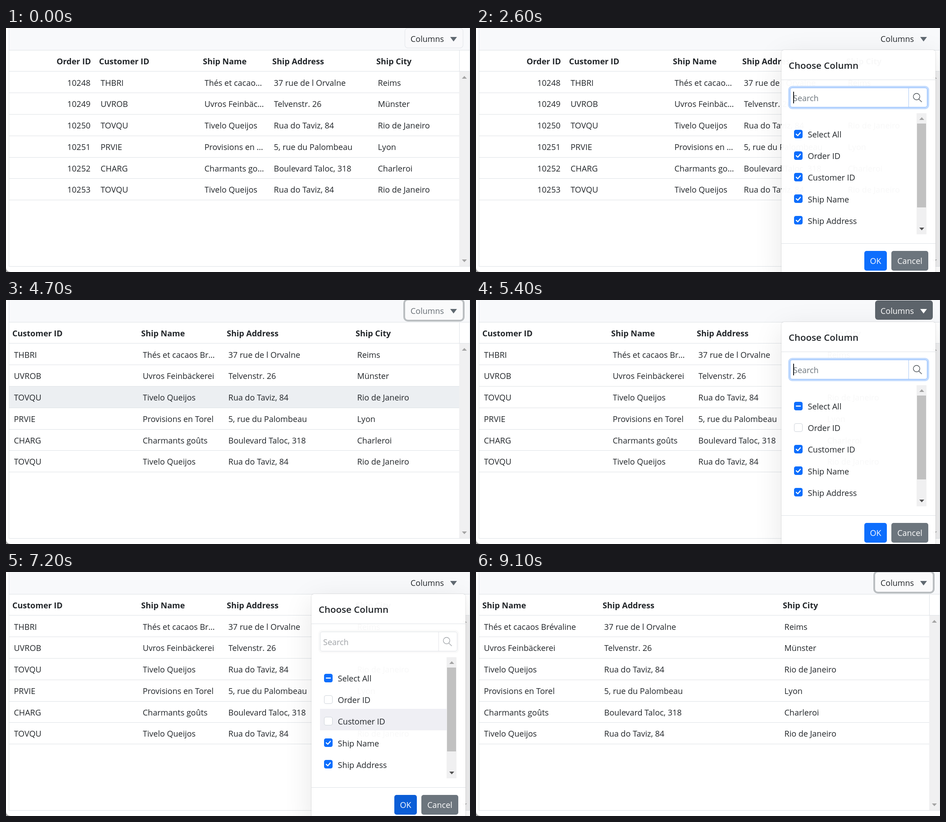
Recreate the animation shown at these times as an HTML page. Size 1030 px wide and 544 px high, loop 9200 ms.

```html
<!DOCTYPE html>
<html lang="en">
<head>
<meta charset="utf-8">
<title>Column chooser</title>
<style>
html, body { margin: 0; width: 100%; height: 100%; overflow: hidden; background: #a2a2a2; }
#stage {
  position: absolute; left: 0; top: 0; width: 1030px; height: 544px; overflow: hidden;
  background: #fff; border-radius: 0 0 0 10px; color: #212529;
  font: 18px/24px "Open Sans", "Noto Sans", sans-serif;
}
#stage div { position: absolute; box-sizing: border-box; white-space: nowrap; }
.line { background: #dee2e6; }
.bar { background: #f8f9fb; }
.head { font-weight: 700; }
.cell { overflow: hidden; text-overflow: ellipsis; }
.right { text-align: right; }
.hover { background: #eceff2; }
.track { background: #f0f0f1; }
.thumb { background: #c1c1c1; }
.up, .down { background: #a3a3a3; clip-path: polygon(0 100%, 50% 0, 100% 100%); }
.down { clip-path: polygon(0 0, 100% 0, 50% 100%); }
.dark { background: #505050; }

.menu { border-radius: 6px; }
.menu .down { background: #5f6870; }
.menu.outlined { background: #f9f9fb; box-shadow: 0 0 0 1px #e2e5e9; }
.menu.pressed { background: #5c636a; color: #fff; }
.menu.pressed .down { background: #fff; }
.menu.ring { background: #fafafb; box-shadow: 0 0 0 4px #babec1; }
.menu.ring.pressed { background: #5c636a; }
.menu.grey { color: #666d74; }

.popup {
  background: rgba(255, 255, 255, .97); border-radius: 6px 6px 0 0;
  box-shadow: 0 0 0 1px rgba(0, 0, 0, .09), 0 16px 64px rgba(0, 0, 0, .1);
}
.title { font-size: 20.5px; font-weight: 600; }
.search { border: 1px solid #dee2e6; border-radius: 5px; background: #fff; color: #a0a4a8; box-shadow: 0 0 0 4px #fafafa; }
.search .line { background: #e4e6e9; }
.search.focus { border-color: #86b7fe; color: #6c757d; box-shadow: 0 0 0 4px #c2dbfe; }
.search.focus .line { background: #a9c9f5; }
.search svg { position: absolute; left: 271px; top: 10px; stroke: #a5a9ad; fill: none; stroke-width: 1.4; }
.search.focus svg { stroke: #50565c; }
.caret { background: #212529; }
.pick { background: #efeff4; }
.check { border-radius: 4px; border: 1px solid #ced4da; background: #fff; }
.check svg { position: absolute; left: -1px; top: -1px; fill: none; stroke: #fff; stroke-width: 2.4; stroke-linecap: round; stroke-linejoin: round; }
.check.on, .check.some { background: #0d6efd; border-color: #0d6efd; }
.check .tick, .check .dash { display: none; }
.check.on .tick, .check.some .dash { display: inline; }
.button { border-radius: 5px; color: #fff; text-align: center; line-height: 45px; background: #6c757d; }
</style>
</head>
<body>
<div id="stage"></div>
<script>
const LOOP = 9200;
const stage = document.getElementById('stage');

function box(parent, cls, x, y, w, h, text = '') {
  const el = document.createElement('div');
  el.className = cls;
  Object.assign(el.style, { left: x + 'px', top: y + 'px', width: w + 'px', height: h + 'px' });
  el.textContent = text;
  parent.append(el);
  return el;
}

// Text centred on a line; y is the middle
const label = (parent, cls, x, y, w, text) => box(parent, cls, x, y - 12, w, 24, text);
const show = (el, on) => { el.style.visibility = on ? 'inherit' : 'hidden'; };

const orders = [
  ['10248', 'THBRI', 'Thés et cacaos Brévaline', '37 rue de l Orvalne', 'Reims'],
  ['10249', 'UVROB', 'Uvros Feinbäckerei', 'Telvenstr. 26', 'Münster'],
  ['10250', 'TOVQU', 'Tivelo Queijos', 'Rua do Taviz, 84', 'Rio de Janeiro'],
  ['10251', 'PRVIE', 'Provisions en Torel', '5, rue du Palombeau', 'Lyon'],
  ['10252', 'CHARG', 'Charmants goûts', 'Boulevard Taloc, 318', 'Charleroi'],
  ['10253', 'TOVQU', 'Tivelo Queijos', 'Rua do Taviz, 84', 'Rio de Janeiro']
];
const titles = ['Order ID', 'Customer ID', 'Ship Name', 'Ship Address', 'Ship City'];
// Left edge of each column that is shown, and room for the ship name
const layouts = [
  { first: 0, left: [14, 206.5, 437, 591, 822], nameRoom: 133 },
  { first: 1, left: [14, 300, 490, 776], nameRoom: 168 },
  { first: 2, left: [14, 281, 681], nameRoom: 250 }
];
const rowTop = i => Math.round(96.5 + 47.75 * i);

// Grid
box(stage, 'bar', 6, 0, 1024, 49);
const rowHover = box(stage, 'hover', 7, 0, 999, 47);
const views = layouts.map(({ first, left, nameRoom }) => {
  const view = box(stage, '', 0, 0, 1030, 544);
  left.forEach((x, n) => {
    const col = first + n;
    const side = col === 0 ? ' right' : '';
    label(view, 'head' + side, x, 74, side ? 174.5 : 190, titles[col]);
    const room = side ? 170 : col === 2 ? nameRoom : 205;
    orders.forEach((order, i) =>
      label(view, 'cell' + side, x + 3.5, rowTop(i) + 25, room, order[col]));
  });
  return view;
});
box(stage, 'line', 6, 0, 1, 532);
box(stage, 'line', 6, 49, 1024, 1);
box(stage, 'line', 6, 96, 1024, 1);
for (let i = 1; i <= 6; i++) box(stage, 'line', 6, rowTop(i), 1000, 1);
box(stage, 'line', 6, 531, 1024, 1);
box(stage, 'line', 1006, 49, 1, 48);
box(stage, 'track', 1006, 97, 23, 434);
box(stage, 'up', 1012, 107, 11, 6);
box(stage, 'down', 1012, 516, 11, 6);
box(stage, 'line', 1029, 0, 1, 532);

// Popup, in its own coordinates
const popup = box(stage, 'popup', 678, 49, 342, 510);
label(popup, 'title', 16, 34, 200, 'Choose Column');
box(popup, 'line', 0, 66, 342, 1);
box(popup, 'line', 0, 431, 342, 1);

const search = box(popup, 'search', 19, 84, 305, 44);
label(search, '', 6, 22, 100, 'Search');
box(search, 'line', 262, 0, 1, 42);
search.insertAdjacentHTML('beforeend',
  '<svg width="24" height="24"><circle cx="9" cy="9" r="7.2"/><path d="M14 14.5L20.5 21"/></svg>');
const caret = box(popup, 'caret', 26, 93, 2, 26);

const pick = box(popup, 'pick', 19, 0, 281, 48);
const checks = ['Select All', ...titles.slice(0, 4)].map((text, i) => {
  const y = 187 + 48.2 * i;
  label(popup, '', 58.5, y + 1, 200, text);
  const el = box(popup, 'check', 28, Math.round(y - 9.5), 19, 19);
  el.innerHTML = '<svg width="19" height="19"><path class="tick" d="M5 9.8L8.3 13L14 6.5"/>' +
    '<path class="dash" d="M5 9.5H14"/></svg>';
  return el;
});
box(popup, 'track', 300, 141, 22, 270);
box(popup, 'thumb', 301, 164, 20, 187);
box(popup, 'up', 306, 150, 11, 6);
box(popup, 'down dark', 306, 396, 11, 6);
const ok = box(popup, 'button', 184, 448, 50, 44, 'OK');
box(popup, 'button', 244, 448, 82, 44, 'Cancel');

// Toolbar button
const menu = box(stage, 'menu', 886, 1, 128, 43);
label(menu, '', 12, 23, 90, 'Columns');
box(menu, 'down', 100, 19, 15, 10);

const BLUE = '#0d6efd', MID = '#0c66ea', DEEP = '#0b5ed7', ACTIVE = '#0a58ca';
const idle = {
  menu: 'outlined', view: 0, row: -1, popup: 0, focus: true, caret: true,
  pick: -1, checks: ['on', 'on', 'on', 'on', 'on'], ok: BLUE, okRing: false
};
const noOrder = ['some', '', 'on', 'on', 'on'];
const noCustomer = ['some', '', '', 'on', 'on'];
const fresh = { focus: true, caret: true, pick: -1, ok: BLUE, okRing: false };

const closing = (t, view) => [
  [t, { okRing: true, ok: DEEP }],
  [t + 100, { view, popup: .7 }],
  [t + 200, { popup: .3 }],
  [t + 300, { popup: 0, menu: 'ring grey' }]
];
const steps = [
  [0, idle],
  [100, { menu: '' }],
  [1200, { menu: 'pressed' }],
  [1600, { popup: 1 }],
  [1800, { menu: '' }],
  [2100, { caret: false }],
  [2600, { caret: true }],
  [2800, { focus: false, caret: false, pick: 1 }],
  [3000, { checks: noOrder }],
  [3300, { ok: MID }],
  [3400, { ok: DEEP }],
  [3600, { ok: ACTIVE }],
  ...closing(4000, 1),
  [4600, { row: 3 }],
  [4700, { row: 2 }],
  [4800, { row: 0 }],
  [4900, { row: -1, menu: 'ring pressed' }],
  [5000, { menu: 'pressed' }],
  [5300, { ...fresh, popup: .5 }],
  [5400, { popup: 1 }],
  [5600, { menu: '' }],
  [5900, { caret: false }],
  [6400, { caret: true }],
  [6600, { focus: false, caret: false, pick: 2, checks: noCustomer }],
  [7200, { ok: DEEP }],
  ...closing(7800, 2),
  [9100, { menu: 'ring' }]
];

function draw(time) {
  const s = Object.assign({}, ...steps.filter(([t]) => t <= time).map(([, change]) => change));
  menu.className = 'menu ' + s.menu;
  views.forEach((view, i) => show(view, i === s.view));
  show(rowHover, s.row >= 0);
  rowHover.style.top = rowTop(s.row) + 1 + 'px';
  show(popup, s.popup > 0);
  popup.style.opacity = s.popup;
  search.className = s.focus ? 'search focus' : 'search';
  show(caret, s.caret);
  show(pick, s.pick >= 0);
  pick.style.top = Math.round(159 + 48.5 * s.pick) + 'px';
  checks.forEach((el, i) => { el.className = 'check ' + s.checks[i]; });
  ok.style.background = s.ok;
  ok.style.boxShadow = s.okRing ? '0 0 0 3px rgba(13, 110, 253, .4)' : 'none';
}

const start = performance.now();
function tick() {
  draw((performance.now() - start) % LOOP);
  requestAnimationFrame(tick);
}
draw(0);
requestAnimationFrame(tick);
</script>
</body>
</html>
```
